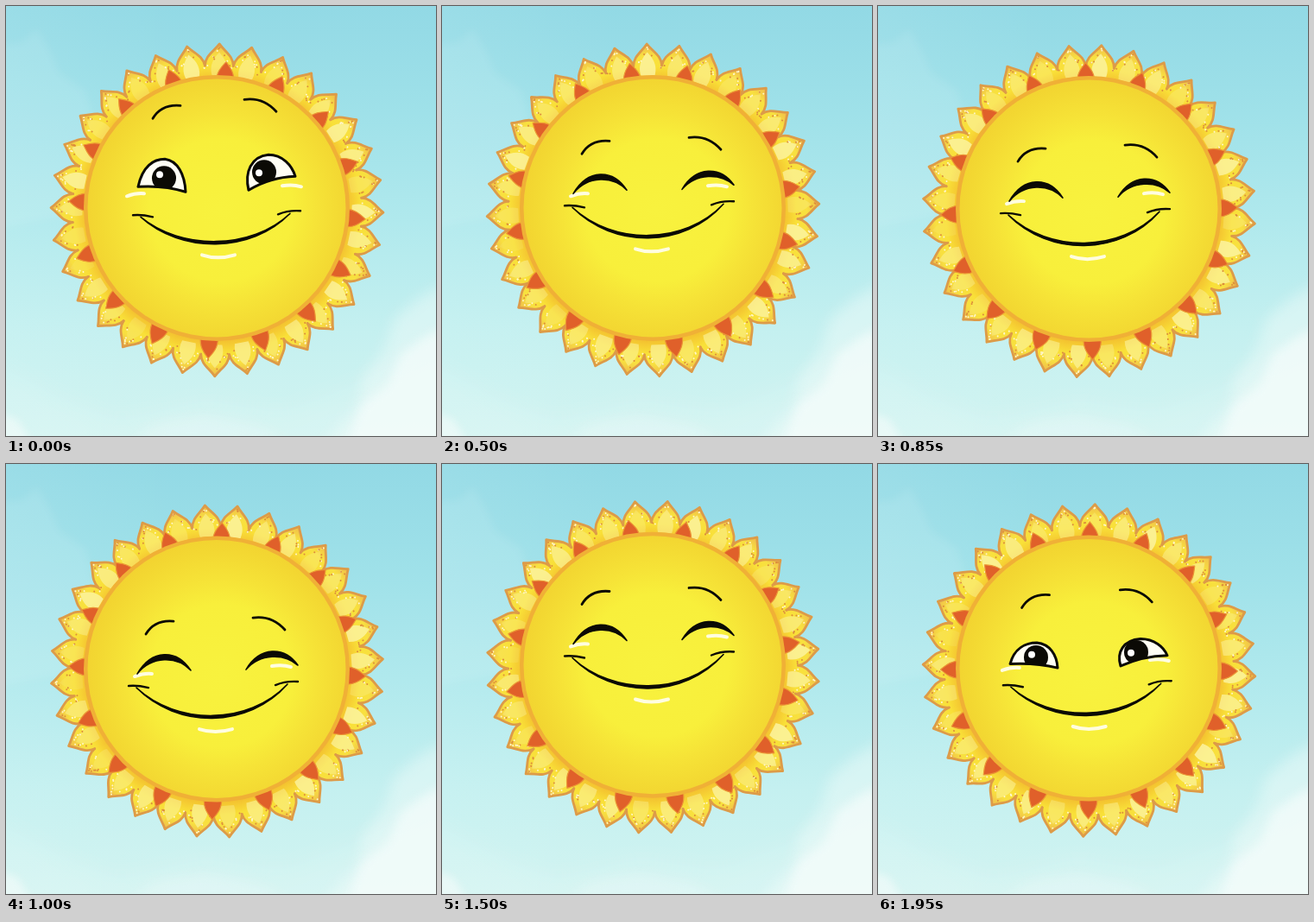
An HTML page with a canvas for the animation above (2000 ms loop, 498 px wide and 498 px high).

```html
<!DOCTYPE html>
<html lang="en">
<head>
<meta charset="utf-8">
<title>Smiling sun</title>
<style>
html, body { margin: 0; width: 100%; height: 100%; overflow: hidden; background: #b4eaee; }
canvas { display: block; width: 100vw; height: 100vh; }
</style>
</head>
<body>
<canvas id="stage" width="498" height="498"></canvas>
<script>
const SIZE = 498, LOOP = 2000, STEP = 50, TAU = Math.PI * 2;
const INK = '#0b0a05', SHINE = '#fffde0';
const ctx = document.getElementById('stage').getContext('2d');
const rad = deg => deg * Math.PI / 180;
const rand = seed => { const v = Math.sin(seed * 12.9898) * 43758.5453; return v - Math.floor(v); };

function shade(gradient, stops) {
  stops.forEach(([at, color]) => gradient.addColorStop(at, color));
  return gradient;
}
const linear = (y0, y1, stops) => shade(ctx.createLinearGradient(0, y0, 0, y1), stops);
const radial = (x, y, r, stops) => shade(ctx.createRadialGradient(x, y, 0, x, y, r), stops);

function fill(path, color) { ctx.fillStyle = color; ctx.fill(path); }
function stroke(path, color, width) {
  ctx.strokeStyle = color;
  ctx.lineWidth = width;
  ctx.stroke(path);
}
function dot(x, y, r, color) {
  ctx.beginPath();
  ctx.arc(x, y, r, 0, TAU);
  ctx.fillStyle = color;
  ctx.fill();
}
function at(x, y, draw) {
  ctx.save();
  ctx.translate(x, y);
  draw();
  ctx.restore();
}

// Soft cloud: a blurred outline in translucent white
function cloud(path, alpha, blur) {
  ctx.save();
  ctx.filter = `blur(${blur}px)`;
  fill(new Path2D(path), `rgba(246,252,251,${alpha})`);
  ctx.restore();
}

function drawSky() {
  ctx.fillStyle = linear(0, SIZE, [[0, '#92d9e5'], [.25, '#9fe1e9'], [.5, '#b0e9ed'], [.75, '#c4f0f0'], [1, '#d2f4f1']]);
  ctx.fillRect(0, 0, SIZE, SIZE);
  const left = ctx.createLinearGradient(0, 0, 200, 0);
  ctx.fillStyle = shade(left, [[0, 'rgba(225,250,249,.1)'], [1, 'rgba(225,250,249,0)']]);
  ctx.fillRect(0, 0, 200, SIZE);
  cloud('M-20 45 L18 42 L36 26 L50 50 L62 78 L92 98 L110 160 L80 240 L-20 260Z', .1, 5);
  cloud('M-20 410 L20 430 L60 452 L130 480 L230 455 L320 470 L400 440 L520 380 V520 H-20Z', .14, 14);
  cloud('M520 315 L478 338 L450 362 L438 398 L412 432 L408 462 L380 492 L360 520 H520Z', .42, 8);
  cloud('M520 365 L482 385 L458 402 L442 438 L412 462 L390 520 H520Z', .7, 6);
  cloud('M-10 470 L14 480 L32 510 H-10Z', .6, 5);
  cloud('M140 505 L175 482 L230 474 L290 486 L330 505Z', .25, 7);
}

const petal = new Path2D('M-18 -144 L-17 -166 C-16 -179 -7 -183 0 -192.5 C7 -183 16 -179 17 -166 L18 -144Z');
const petalTip = new Path2D('M-16.5 -167 C-16 -179 -7 -183 0 -192.5 C7 -183 16 -179 16.5 -167');
const glow = new Path2D('M-8 -156 C-12 -169 -5 -177 0 -183 C5 -177 12 -169 8 -156Z');
const ember = new Path2D('M-10 -148 C-11 -160 -4 -167 0 -172 C4 -167 11 -160 10 -148Z');

function ring(count, phase, draw) {
  for (let i = 0; i < count; i++) {
    ctx.save();
    ctx.rotate(rad(phase) + i * TAU / count);
    draw(i);
    ctx.restore();
  }
}

function drawPetals(n) {
  const body = linear(-190, -150, [[0, '#f0c04a'], [.3, '#f8e040'], [.6, '#f9e038'], [1, '#f3c02f']]);
  const turn = .8 + .92 * n;
  ring(32, turn, () => fill(petal, body));
  ring(32, turn, i => {
    stroke(petalTip, '#dd9b48', 2.8);
    ctx.globalAlpha = .15 + .7 * rand(i + 5);
    fill(glow, '#fbf3a0');
    ctx.globalAlpha = 1;
    for (let k = 0; k < 12; k++) {
      const h = rand(i * 17 + k + 1), side = k % 2 ? 1 : -1;
      const x = side * 16 * (1 - h) * (.65 + .4 * rand(i + k * 31));
      const light = rand(i * 7 + k * 3 + n) > .45;
      dot(x, -163 - 26 * h, 1, light ? '#fff6cc' : '#dc8c3c');
    }
  });
  ring(16, 3.5 + 1.1 * n, () => {
    fill(ember, '#e0602a');
    stroke(ember, '#eb9434', 1.2);
  });
}

function drawDisc(cy, nod) {
  dot(244, cy, 154, '#f0b036');
  dot(244, cy, 149.5, radial(249, 232 + .35 * nod, 180,
    [[0, '#f8f23e'], [.46, '#f8ef3b'], [.62, '#f6e337'], [.8, '#f3d832'], [1, '#f1cc2e']]));
}

// Tapered arc between two points, bulging between two control heights
function crescent(x0, y0, x1, y1, high, low) {
  const a = x0 + .27 * (x1 - x0), b = x0 + .74 * (x1 - x0);
  const path = new Path2D(`M${x0} ${y0} C${a} ${high} ${b} ${high} ${x1} ${y1} C${b} ${low} ${a} ${low} ${x0} ${y0}Z`);
  fill(path, INK);
  stroke(path, INK, 1.6);
}

function openEye(shape, x, y, lid, pupil, glint) {
  at(x, y, () => {
    const path = new Path2D();
    path.addPath(new Path2D(shape), new DOMMatrix([1, 0, 0, lid, 0, 0]));
    fill(path, '#fffef4');
    ctx.save();
    ctx.clip(path);
    dot(pupil[0], pupil[1] * lid, 14, INK);
    dot(glint[0], glint[1] * lid, 4, '#fff');
    ctx.restore();
    stroke(path, INK, 3);
  });
}

function drawBrows(e) {
  at(8 * e, 2 - 41 * e, () => stroke(new Path2D('M162 158 Q172 141 194 143'), INK, 2.8));
  at(-10 * e, 2 - 44 * e, () => stroke(new Path2D('M286 139 Q308 136 323 153'), INK, 2.8));
}

function drawEyes(e) {
  if (e < .2) {
    crescent(152, 206, 214, 202, 177, 185);
    crescent(278, 201, 338, 196, 174, 182);
    return;
  }
  const lid = .45 + .55 * e;
  openEye('M-28 -6 C-23 -30 -10 -38 3 -38 C18 -36 26 -20 27 0 Q2 -8 -28 -6Z', 181, 209 - 5 * e, lid, [2, -16], [-3, -20]);
  openEye('M-23 -1 C-28 -22 -20 -40 0 -42 C16 -42 27 -30 31 -17 Q2 -16 -23 -1Z', 304, 207 - 4 * e, lid, [-5, -22], [-11, -21]);
}

function drawMouth(e) {
  const low = 256 + 7 * e, lx = 142 + 5 * e, rx = 338 + 3 * e;
  const ly = 220 + 11 * e, ry = 215 + 11 * e;
  const dip = low + (low - (ly + ry) / 2 - 3) / 3;
  crescent(lx + 9, ly + 2, rx - 12, ry + 3, dip - 2, dip + 2);
  stroke(new Path2D(`M${lx} ${ly} Q${lx + 10} ${ly - 1} ${lx + 23} ${ly + 2}`), INK, 2.4);
  stroke(new Path2D(`M${rx - 26} ${ry + 4} Q${rx - 14} ${ry - 1} ${rx} ${ry}`), INK, 2.4);
  stroke(new Path2D(`M${224 + 3 * e} ${low + 14} q18 6 38 0`), SHINE, 4);
}

function drawCheeks(e) {
  stroke(new Path2D(`M${149 - 9 * e} 209 q11 -4 20 -3`), SHINE, 4);
  stroke(new Path2D(`M${308 + 12 * e} 197 q12 -2 22 1`), SHINE, 4);
}

const sky = document.createElement('canvas');
sky.width = sky.height = SIZE;
drawSky();
sky.getContext('2d').drawImage(ctx.canvas, 0, 0);
ctx.lineCap = ctx.lineJoin = 'round';

function render(now) {
  const tick = Math.floor(now % LOOP / STEP);
  const n = Math.max(0, tick - 1);
  const t = n ? tick * STEP : 0;
  const nod = 19 * (1 + Math.cos(TAU * (t - 250) / 790));
  // 1 = eyes wide and brows raised, 0 = squinting
  const e = Math.max(0, 1 - t / 200, (t - 1710) / 420);
  const cy = 232.3 + .14 * nod;

  ctx.drawImage(sky, 0, 0);
  at(244.5, cy + 2.5, () => drawPetals(n));
  drawDisc(cy, nod);
  at(0, nod, () => [drawCheeks, drawBrows, drawEyes, drawMouth].forEach(draw => draw(e)));
  requestAnimationFrame(() => render(performance.now() - start));
}
const start = performance.now();
render(0);
</script>
</body>
</html>
```
